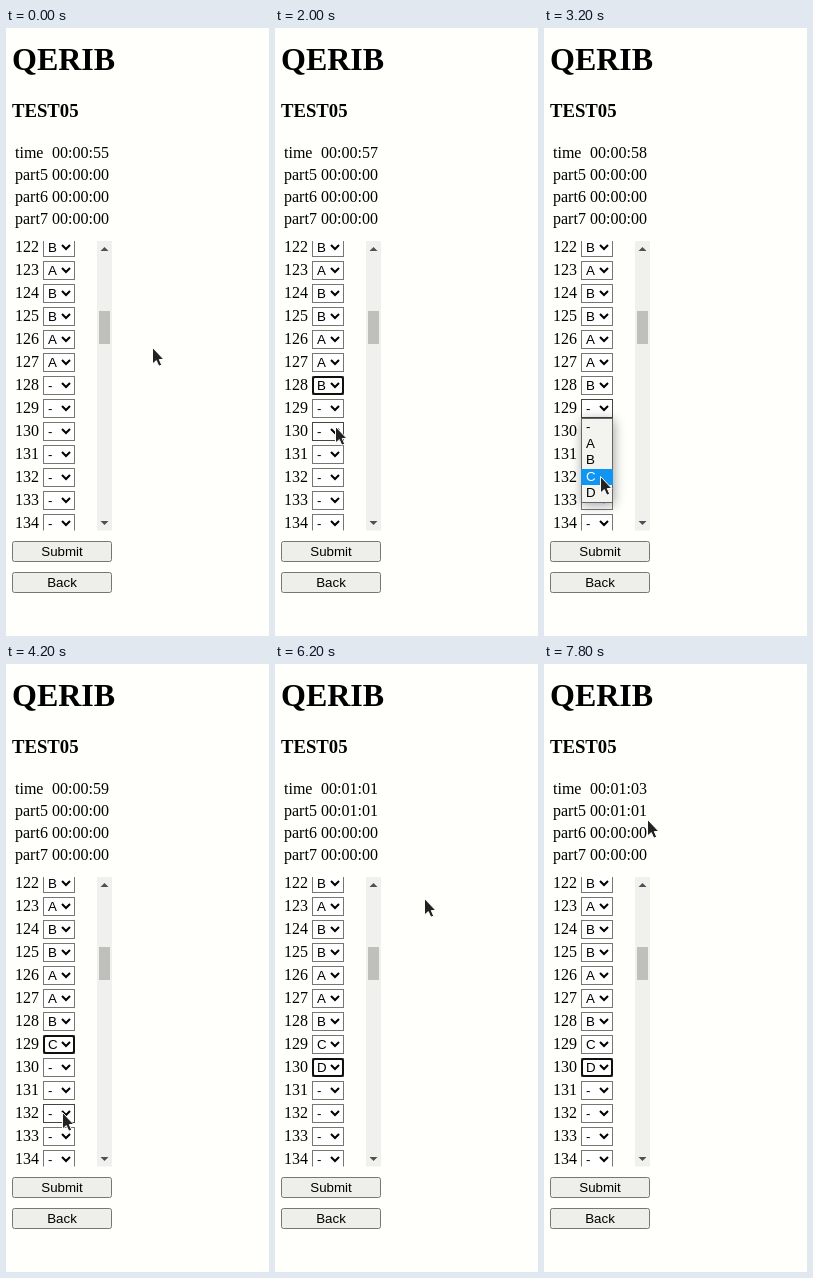
An HTML page for the animation above (8.2 s loop, 263x608 px).

```html
<!DOCTYPE html>
<html lang="en">
<head>
<meta charset="utf-8">
<title>Answer sheet</title>
<style>
  html, body { margin: 0; width: 100%; height: 100%; overflow: hidden; background: #fffffb; }
  svg { display: block; }
  text { font: 16px "Liberation Serif", "Times New Roman", serif; white-space: pre; }
  .h1 { font-size: 32px; font-weight: bold; }
  .h3 { font-size: 18.72px; font-weight: bold; }
  .ui { font: 13.333px "Liberation Sans", Arial, sans-serif; }
  .mid { text-anchor: middle; }
  .box { fill: #fff; stroke: #767676; }
  .box.hover { stroke: #444; }
  .ring { fill: none; stroke: #101010; stroke-width: 2; visibility: hidden; }
  .ring.on { visibility: visible; }
  .chevron { fill: none; stroke: #000; stroke-width: 2; }
  .button { fill: #eeeeea; stroke: #767676; }
  .panel { fill: #f3f3f0; stroke: #666; }
  #popup { filter: drop-shadow(1px 2px 6px rgba(0, 0, 0, .38)); }
  #mark { fill: #1095f2; }
  .lit { fill: #fff; }
  #pointer path { fill: #222; stroke: #fff; stroke-width: 1; stroke-linejoin: round; }
</style>
</head>
<body>
<svg width="263" height="608" viewBox="0 0 263 608">
  <defs><clipPath id="view"><rect x="6" y="213" width="100" height="289.5"/></clipPath></defs>
  <text class="h1" x="6" y="42">QERIB</text>
  <text class="h3" x="6" y="89">TEST05</text>
  <g id="times"></g>
  <g id="list" clip-path="url(#view)"></g>
  <g id="scrollbar">
    <rect x="91" y="213" width="15" height="289.5" fill="#f0f0ee"/>
    <rect x="93" y="283" width="11" height="33" fill="#bfbfbc"/>
    <path d="M94.5 223h8l-4-4zM94.5 493h8l-4 4z" fill="#505050"/>
  </g>
  <g id="buttons"></g>
  <g id="popup"></g>
  <g id="pointer"><path d="M.5 .5V17L4.3 13.6L6.8 19.2L9.7 18L7.3 12.5H11.9Z"/></g>
</svg>
<script>
const LOOP = 8200, STEP = 100;
const FIRST = 122, ROW = 23, BOX = 19, ITEM = 16.5;
const OPTIONS = '-ABCD';
const START = 'BABBAA-------';
const byId = id => document.getElementById(id);
const rowTop = q => 212 - 2 + (q - FIRST) * ROW;
const menuTop = q => rowTop(q) + BOX;
const itemTop = i => Math.round(1 + i * ITEM);

// The pointer reaches a box, its menu opens, an option is picked, the menu closes, the value appears.
const answers = [
  { q: 128, value: 'B', reach: [100, 500], open: 800, pick: [1000, 1600], close: 1700, set: 2000 },
  { q: 129, value: 'C', reach: [1900, 2400], open: 2700, pick: [2700, 3200], close: 3800, set: 3800 },
  { q: 130, value: 'D', reach: [4200, 4600], open: 4800, pick: [5000, 5300], close: 5700, set: 5900 }
];
const finished = answers[2].set;

const glide = ([from, to], x, y) => ({ from, to, x, y });
const moves = [
  ...answers.flatMap((a, i) => [
    glide(a.reach, 61, rowTop(a.q) + 10),
    glide(a.pick, 60 - 4 * i, menuTop(a.q) + (OPTIONS.indexOf(a.value) + .5) * ITEM)
  ]),
  glide([5800, 6200], 149, 234),
  glide([6200, 6900], 42, 157),
  glide([7000, 7400], 122, 159),
  glide([7500, 7800], 103, 155)
];

function pointerAt(t) {
  let x = 146, y = 319;
  for (const m of moves) {
    const left = 1 - Math.min(1, Math.max(0, (t - m.from) / (m.to - m.from)));
    const k = 1 - left * left;
    x += (m.x - x) * k;
    y += (m.y - y) * k;
  }
  return [Math.round(x), Math.round(y)];
}

function clockText(seconds) {
  const pad = n => String(n).padStart(2, '0');
  return `00:${pad(Math.floor(seconds / 60))}:${pad(seconds % 60)}`;
}

function add(parent, tag, attrs, text = '') {
  const node = document.createElementNS('http://www.w3.org/2000/svg', tag);
  for (const key in attrs) node.setAttribute(key, attrs[key]);
  node.textContent = text;
  return parent.appendChild(node);
}

const frame = (parent, cls, x, y, width, height, rx = 0) =>
  add(parent, 'rect', { class: cls, x: x + .5, y: y + .5, width: width - 1, height: height - 1, rx });

const setText = (node, text) => { if (node.textContent !== text) node.textContent = text; };

const clocks = ['time', 'part5', 'part6', 'part7'].map((name, i) => {
  const y = 130 + i * 22;
  add(byId('times'), 'text', { x: 9, y }, name);
  return add(byId('times'), 'text', { x: 46, y }, '00:00:00');
});

const rows = [...START].map((start, i) => {
  const q = FIRST + i, top = rowTop(q), list = byId('list');
  add(list, 'text', { x: 9, y: top + 14 }, q);
  const box = frame(list, 'box', 37, top, 32, BOX);
  const label = add(list, 'text', { class: 'ui', x: 42, y: top + 14 }, start);
  add(list, 'path', { class: 'chevron', d: `M56 ${top + 7}l4 4l4 -4` });
  const ring = add(list, 'rect', { class: 'ring', x: 38, y: top + 1, width: 30, height: 17, rx: 2 });
  return { q, top, start, box, label, ring };
});

['Submit', 'Back'].forEach((name, i) => {
  const y = 513 + i * 31;
  frame(byId('buttons'), 'button', 6, y, 100, 21, 2);
  add(byId('buttons'), 'text', { class: 'ui mid', x: 56, y: y + 15 }, name);
});

const popup = byId('popup');
frame(popup, 'panel', 37, 0, 32, 85);
const mark = add(popup, 'rect', { id: 'mark', x: 37, width: 32 });
const items = [...OPTIONS].map((name, i) =>
  add(popup, 'text', { class: 'ui', x: 42, y: itemTop(i) + 12 }, name));

function drawPopup(menu, y) {
  popup.style.display = menu ? '' : 'none';
  if (!menu) return;
  const top = menuTop(menu.q);
  const index = Math.min(4, Math.max(0, Math.floor((y - top - 1) / ITEM)));
  popup.setAttribute('transform', `translate(0 ${top})`);
  mark.setAttribute('y', itemTop(index));
  mark.setAttribute('height', itemTop(index + 1) - itemTop(index));
  items.forEach((item, i) => item.classList.toggle('lit', i === index));
}

function draw(time) {
  const t = Math.floor(time % LOOP / STEP) * STEP;
  const [x, y] = pointerAt(t);
  byId('pointer').setAttribute('transform', `translate(${x} ${y})`);

  setText(clocks[0], clockText(55 + Math.floor((t + 700) / 1000)));
  setText(clocks[1], clockText(t >= finished ? 61 : 0));

  const latest = answers.filter(a => t >= a.open).pop();
  const menu = latest && t < latest.close ? latest : null;
  const busy = latest && t < latest.close + 200;
  for (const row of rows) {
    const answer = answers.find(a => a.q === row.q && t >= a.set);
    setText(row.label, answer ? answer.value : row.start);
    row.ring.classList.toggle('on', !!answer && answer === latest);
    const over = x >= 37 && x < 69 && y >= row.top && y < row.top + BOX;
    row.box.classList.toggle('hover', busy ? row.q === latest.q : over);
  }
  drawPopup(menu, y);
}

const began = performance.now();
function loop() {
  draw(performance.now() - began);
  requestAnimationFrame(loop);
}
loop();
</script>
</body>
</html>
```
